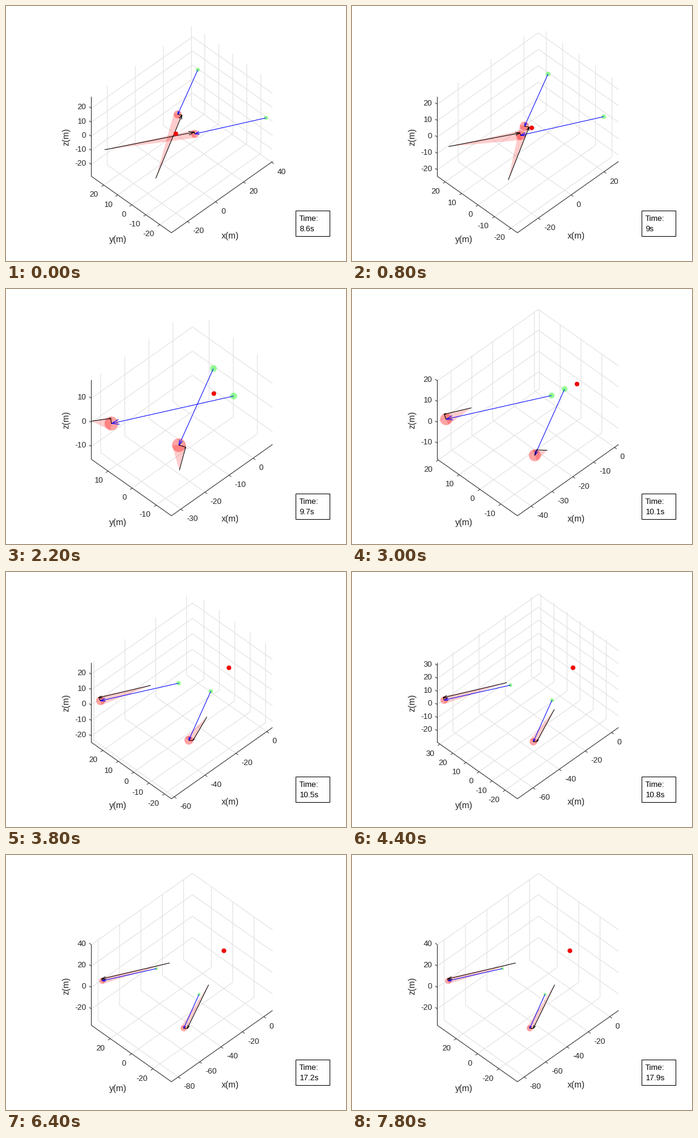
A matplotlib script for the animation above (8 s loop, 560x420 px).

```python
import math

import numpy as np
import matplotlib.pyplot as plt
from matplotlib.animation import FuncAnimation
from matplotlib.patches import Circle, Polygon, Rectangle

W, H, DPI = 560, 420, 100
PX = 72 / DPI                      # points per pixel
FRAMES, STEP = 40, 200
plt.rcParams["font.family"] = "Liberation Sans"

CORNER = np.array([272.5, 373.5])  # front corner of the axes box
X_SPAN, Y_SPAN = 166.5, 132        # box edges, horizontal pixels
SLOPE = 0.705
DARK, GRID = "#262626", "#dfdfdf"

# time, pixels per metre, xmin, ymin, zmin, zmax, miss vector A, miss vector B
KEYS = np.array([
    [8.6, 2.31, -31.4, -28.3, -28.5, 28.2, -0.4, -1.3, 3.0, 0.4],
    [9.3, 3.10, -33.7, -20.8, -20.5, 21.7, -0.3, -1.6, 2.6, 0.6],
    [9.7, 3.97, -33.9, -16.3, -15.3, 17.6, -0.3, -2.1, 2.8, 0.8],
    [9.9, 3.94, -40.2, -16.2, -15.5, 17.8, -0.6, -2.3, 2.2, -1.0],
    [10.1, 3.43, -46.6, -18.0, -17.7, 20.4, -0.9, -2.4, 0.9, -2.6],
    [10.5, 2.54, -61.8, -24.5, -24.1, 27.4, -1.2, -2.0, 2.8, 0.0],
    [11.2, 1.79, -85.4, -35.9, -35.1, 38.1, -0.2, -1.7, 2.6, -0.2],
    [11.3, 1.76, -86.4, -37.3, -35.4, 40.05, -0.6, -1.7, 3.4, 0.0],
])

# fixed station, start, velocity (projected metres) and stopping time
BODIES = [
    (np.array([-50.7, 11.4]), np.array([64.3, -11.3]), np.array([-51.0, 11.2]), 11.1),
    (np.array([-14.3, 31.8]), np.array([15.7, -45.6]), np.array([-14.45, 32.0]), 11.3),
]
BALL, TARGET = 2.85, 1.4

fig = plt.figure(figsize=(W / DPI, H / DPI), dpi=DPI, facecolor="white")
ax = fig.add_axes([0, 0, 1, 1])


def line(pts, color, width=1.0, z=3):
    xs, ys = zip(*pts)
    ax.plot(xs, ys, color=color, lw=width * PX, zorder=z,
            solid_capstyle="butt", solid_joinstyle="miter")


def text(x, y, s, size=13, ha="left", color=DARK, rot=0):
    ax.text(x, y, s, fontsize=size * PX, ha=ha, va="baseline", color=color,
            rotation=rot, rotation_mode="anchor", zorder=8)


def arrow(a, b, color):
    d = b - a
    n = np.array([-d[1], d[0]])
    line([a, b], color, z=5)
    line([b - 0.062 * d + 0.02 * n, b, b - 0.062 * d - 0.02 * n], color, z=5)


def disc(c, r, color, alpha=1.0, z=4):
    ax.add_patch(Circle(c, r, fc=color, ec="none", alpha=alpha, zorder=z))


def ticks(lo, hi, step):
    return range(math.ceil(lo / step) * step, math.floor(hi / step) * step + 1, step)


def draw_axes(k, x0, y0, z0, z1):
    x1, y1 = x0 + X_SPAN / k, y0 + Y_SPAN / k

    def proj(x, y, z):
        u, v, w = (x - x0) * k, (y - y0) * k, (z - z0) * k
        return CORNER + (u - v, -SLOPE * (u + v) - w)

    x_step = 20 if x1 - x0 > 60 else 10
    yz_step = 20 if y1 - y0 > 62 else 10
    tick = np.array([3.5, 2.5])

    for x in ticks(x0, x1, x_step):
        p = proj(x, y0, z0)
        line([proj(x, y1, z1), proj(x, y1, z0), p], GRID, z=1)
        line([p, p + tick], DARK, 0.9)
        text(p[0] + 9, p[1] + 19.5, f"{x}")
    for y in ticks(y0, y1, yz_step):
        p = proj(x0, y, z0)
        line([proj(x1, y, z1), proj(x1, y, z0), p], GRID, z=1)
        line([p, p + tick * (-1, 1)], DARK, 0.9)
        text(p[0] - 9, p[1] + 19.5, f"{y}", ha="right")
    for z in ticks(z0, z1, yz_step):
        p = proj(x0, y1, z)
        line([p, proj(x1, y1, z), proj(x1, y0, z)], GRID, z=1)
        line([p, p - tick], DARK, 0.9)
        text(132, p[1] + 2, f"{z}", ha="right")

    line([proj(x0, y1, z1), proj(x0, y1, z0), proj(x0, y0, z0), proj(x1, y0, z0)], DARK)
    text(369, 383, "x(m)", 14.5, "center")
    text(184, 388.5, "y(m)", 14.5, "center")
    text(103, 215, "z(m)", 14.5, "center", rot=90)
    return proj(0, 0, 0)


def draw_body(t, body, miss, origin, k):
    station, start, speed, stop = body
    pos = start + speed * (min(t, stop) - 8.6)
    target = origin + k * pos
    apex = origin + k * station
    ball = origin + k * (pos + station)
    edge = ball + k * miss

    d = ball - apex
    n = np.array([-d[1], d[0]]) / np.hypot(*d) * BALL * k
    ax.add_patch(Polygon([apex, ball + n, ball - n], fc="red", ec="none",
                         alpha=0.2, zorder=2))
    disc(ball, BALL * k, "red", 0.36)
    disc(target, TARGET * k, "#00ff00", 0.42)
    arrow(target, ball, "blue")
    arrow(apex, edge, "black")
    arrow(edge, ball, "black")


def draw_clock(t):
    ax.add_patch(Rectangle((476.5, 336.5), 56, 42, fc="white", ec="black",
                           lw=PX, zorder=7))
    text(483, 354, "Time:", color="black")
    text(483, 371, f"{round(t, 1):g}s", color="black")


def update(i):
    ax.cla()
    ax.set_xlim(0, W)
    ax.set_ylim(H, 0)
    ax.axis("off")

    t = 8.6 + 0.1 * i if i < 30 else 14 + 0.1 * i
    times = KEYS[:, 0]
    k = 1 / np.interp(t, times, 1 / KEYS[:, 1])
    vals = [np.interp(t, times, col) for col in KEYS[:, 2:].T]
    origin = draw_axes(k, *vals[:4])
    for j, body in enumerate(BODIES):
        draw_body(t, body, np.array(vals[4 + 2 * j:6 + 2 * j]), origin, k)
    ax.add_patch(Circle(origin, 3.4, fc="red", ec="#d80000", lw=0.8 * PX, zorder=6))
    draw_clock(t)
    return []


anim = FuncAnimation(fig, update, frames=FRAMES, interval=STEP,
                     init_func=lambda: update(0), repeat=True, repeat_delay=0)
plt.show()
```
